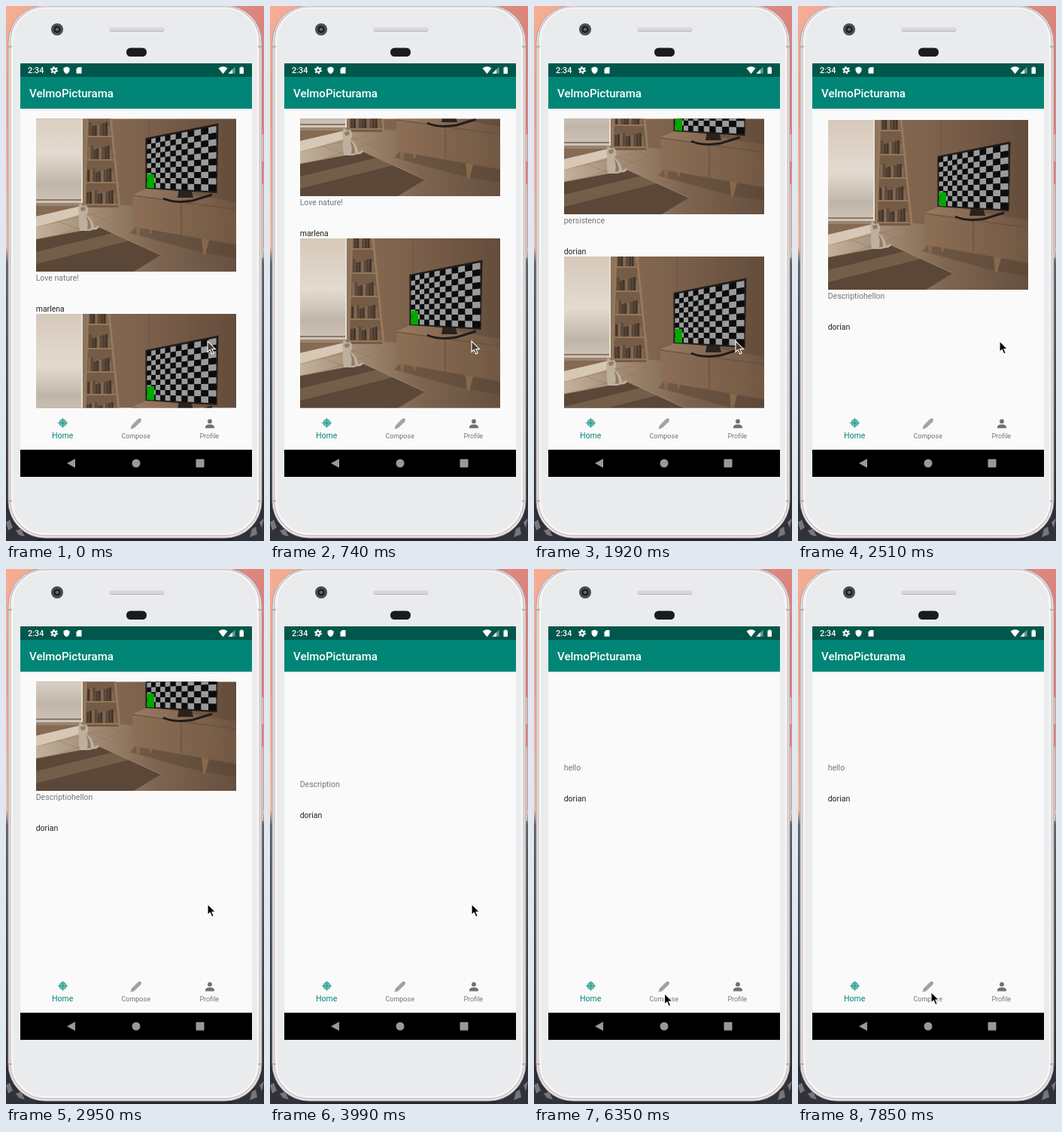
An HTML page that plays this animation: 343x709 px, repeating every 8000 ms.

```html
<!DOCTYPE html>
<html lang="en">
<head>
<meta charset="utf-8">
<title>Photo feed</title>
<style>
  html, body { margin: 0; width: 100%; height: 100%; overflow: hidden; }
  svg { display: block; width: 343px; height: 709px; }
  text { font-family: Roboto, sans-serif; }
  .feed text { font-size: 10.5px; }
  .tab { font-size: 9px; fill: #757575; text-anchor: middle; }
  .tab.on { font-size: 10.5px; fill: #008577; }
</style>
</head>
<body>
<svg viewBox="0 0 343 709" xmlns="http://www.w3.org/2000/svg">
  <defs>
    <linearGradient id="sky" x2="0" y2="1">
      <stop offset="0" stop-color="#f6ad92"/>
      <stop offset=".2" stop-color="#f0a48f"/>
      <stop offset=".45" stop-color="#f3bfa4"/>
      <stop offset=".48" stop-color="#58606c"/>
      <stop offset="1" stop-color="#25272e"/>
    </linearGradient>
    <linearGradient id="dusk">
      <stop offset="0" stop-color="#d97f86" stop-opacity="0"/>
      <stop offset="1" stop-color="#c9686c" stop-opacity=".6"/>
    </linearGradient>
    <linearGradient id="wall">
      <stop offset=".3" stop-color="#866a52"/>
      <stop offset=".65" stop-color="#775c48"/>
      <stop offset="1" stop-color="#644d3c"/>
    </linearGradient>
    <linearGradient id="floor">
      <stop offset="0" stop-color="#c3b19b"/>
      <stop offset=".4" stop-color="#957c65"/>
      <stop offset=".6" stop-color="#7c6450"/>
      <stop offset="1" stop-color="#665040"/>
    </linearGradient>
    <linearGradient id="glass" x2="0" y2="1">
      <stop offset="0" stop-color="#d6c9ba"/>
      <stop offset=".5" stop-color="#e3dad0"/>
      <stop offset=".68" stop-color="#cfc5ba"/>
      <stop offset=".8" stop-color="#c0b5a9"/>
      <stop offset="1" stop-color="#d0c5b8"/>
    </linearGradient>
    <linearGradient id="front">
      <stop offset="0" stop-color="#8d6f56"/>
      <stop offset="1" stop-color="#725843"/>
    </linearGradient>
    <linearGradient id="slab">
      <stop offset="0" stop-color="#987b61"/>
      <stop offset="1" stop-color="#6f5542"/>
    </linearGradient>
    <clipPath id="listClip"><rect x="39" y="149.5" width="268" height="383"/></clipPath>

    <symbol id="room" width="266" height="225" viewBox="0 0 266 225">
      <rect width="266" height="225" fill="url(#wall)"/>
      <path d="M150 0V112M205 0V36M250 0V130" stroke="#584333" stroke-width=".6" opacity=".5"/>
      <path d="M0 152L78 134L128 138L266 178V225H0Z" fill="url(#floor)"/>
      <path d="M0 166L90 145M30 176L115 148M20 155L60 170M60 144L110 164M100 140L165 190" stroke="#87705b" stroke-width=".7" opacity=".6"/>
      <path d="M0 152L64 137V148L0 166Z" fill="#d6c8b5"/>
      <rect width="64" height="136" fill="url(#glass)"/>
      <rect y="129" width="64" height="2" fill="#8b7865"/>
      <rect y="134" width="66" height="4" fill="#988471"/>
      <path d="M62 0H68L66 140H62Z" fill="#8c745e"/>
      <rect x="60" width="2" height="134" fill="#e6ddd2"/>
      <g id="shelf">
        <path d="M69 0H98L110 140H63Z" fill="#755c47"/>
      </g>
      <path d="M69 0L64 149" stroke="#98795d" stroke-width="2.500"/>
      <path d="M97 0L112 149" stroke="#98795d" stroke-width="3"/>
      <path d="M0 182L84 166L166 203L130 225H0Z" fill="#5b4737"/>
      <path d="M0 199L102 174L124 184L0 215Z" fill="#806a55" opacity=".65"/>
      <path d="M0 182L84 166L166 203" fill="none" stroke="#a38b72" stroke-width=".8"/>
      <path d="M125 174L222 200L266 207V190L132 166Z" fill="#54402f" opacity=".45"/>
      <path d="M132 164L134 177H137L139 166ZM220 181L222 202H225L230 183ZM150 168L151 175H153L154 169Z" fill="#86684d"/>
      <path d="M128 123L152 113L266 133V142Z" fill="url(#slab)"/>
      <path d="M128 123L266 142V189L130 165Z" fill="url(#front)"/>
      <path d="M193 133V176M128 124L266 143" fill="none" stroke="#604938" stroke-width=".8"/>
      <path d="M169 128Q184 135 208 131L234 123" fill="none" stroke="#201c1a" stroke-width="3"/>
      <path d="M190 116H206L209 127H188Z" fill="#2a221d"/>
      <path d="M145.500 48L242.500 28.500L240.500 121L145.500 115Z" fill="#211c19"/>
      <g id="screen"></g>
      <path d="M147.500 96H157V114.500L147.500 114Z" fill="#00a800"/>
      <g fill="#bfb09d">
        <path d="M56 142L58 134L62 138L67 137L69 141Q70 147 67 150Q76 156 77 166Q76 171 69 171H58Q56 160 57 150Z"/>
        <path d="M72 169Q82 171 84 165L82 164Q79 168 74 166Z"/>
      </g>
      <path d="M59 140L66 139L65 144L60 145ZM66 151Q73 157 73 168L68 169Q70 159 66 151Z" fill="#907b67"/>
    </symbol>
  </defs>

  <!-- desktop -->
  <rect width="343" height="709" fill="url(#sky)"/>
  <rect width="343" height="320" fill="url(#dusk)"/>
  <path d="M0 668L6 676L11 672L20 688L29 690L42 709H0ZM343 662L337 676L330 680L322 692L310 697L300 709H343Z" fill="#30323a"/>
  <path d="M0 684L5 681L9 691L3 695ZM13 695L20 693L25 703L17 701ZM343 679L337 684L340 692ZM327 693L332 690L334 700L324 704Z" fill="#77757a"/>

  <!-- phone -->
  <rect x="339" y="170" width="3" height="36" rx="1" fill="#d8d2d4"/>
  <rect x="339" y="236" width="3" height="98" rx="1" fill="#d8d2d4"/>
  <rect x="3" y="-1" width="337" height="706" rx="49" fill="#f1eced" stroke="#a4989b"/>
  <rect x="5.500" y="1" width="332" height="701" rx="47" fill="none" stroke="#cabfc2" stroke-width="1.500"/>
  <rect x="8.500" y="2.500" width="326" height="697" rx="44" fill="#eaebed" stroke="#f8f7f8" stroke-width="1.500"/>
  <path d="M3 54H8M335 54H340M3 656H8M335 656H340" stroke="#aaa3a6" stroke-width="1.500"/>
  <circle cx="68" cy="31" r="8" fill="#46494e"/>
  <circle cx="68" cy="31" r="5.500" fill="#222429" stroke="#6b6e74" stroke-width=".8"/>
  <circle cx="68" cy="31" r="2" fill="#6a6e77"/>
  <rect x="137" y="28.500" width="74" height="5.500" rx="2.700" fill="#d8d8da"/>
  <path d="M139 33.500H209" stroke="#b4b4b7"/>
  <rect x="160" y="55.500" width="27" height="11.500" rx="5.500" fill="#191a22"/>

  <!-- app bars -->
  <rect x="19" y="76" width="308" height="548" fill="#fafafa"/>
  <rect x="19" y="136" width="308" height="1" fill="#dfe4e3"/>
  <rect x="19" y="137" width="308" height="1.500" fill="#f1f3f3"/>
  <rect x="19" y="94" width="308" height="42" fill="#008577"/>
  <rect x="19" y="76" width="308" height="18" fill="#00574b"/>
  <g fill="#fff">
    <text x="29" y="89" font-size="10.800" font-weight="500">2:34</text>
    <text x="31" y="121" font-size="15" font-weight="500">VelmoPicturama</text>
    <circle cx="64" cy="85" r="4.200" fill="none" stroke="#fff" stroke-width="1.700" stroke-dasharray="2.200"/>
    <circle cx="64" cy="85" r="2.600" fill="none" stroke="#fff" stroke-width="2"/>
    <path d="M80.500 80.500L84.500 82V85Q84 88.500 80.500 90Q77 88.500 76.500 85V82Z"/>
    <path d="M96 81H100.500V89.500H93.500V83.500Z"/>
    <path d="M282.500 82.500Q288.500 78 294.500 82.500L288.500 90Z"/>
    <path d="M304.500 80.500V89.500H295.500Z" opacity=".4"/>
    <path d="M301 84V89.500H295.500Z"/>
    <path d="M310.500 81.500H312V80.500H314.500V81.500H316V89.700H310.500Z"/>
  </g>

  <g class="feed" clip-path="url(#listClip)"><g id="list"></g></g>

  <!-- tabs -->
  <g fill="none" stroke="#35a598">
    <circle cx="75.500" cy="552.500" r="4.300" stroke-width="1.600" fill="#8fcbc4"/>
    <path d="M75.500 546V559M69 552.500H82" stroke-width="1.200"/>
    <circle cx="75.500" cy="552.500" r="1.800" fill="#35a598"/>
  </g>
  <path d="M165.500 560.500L166.800 556L175 547.800Q176.500 546 178.500 546.500L180 548Q180.500 550 178.700 551.400L170.200 559.500Z" fill="#a3a3a3"/>
  <g fill="#707070">
    <circle cx="271" cy="550.400" r="2.900"/>
    <path d="M265 559.500V557.500Q266 554.500 271 554.500T277 557.500V559.500Z"/>
  </g>
  <text class="tab on" x="75.200" y="573">Home</text>
  <text class="tab" x="172.700" y="573">Compose</text>
  <text class="tab" x="270.300" y="573">Profile</text>

  <rect x="19" y="588" width="308" height="36" fill="#000"/>
  <g fill="#999">
    <path d="M92 600V612L81 606Z"/>
    <circle cx="173" cy="606" r="5.500"/>
    <rect x="252.500" y="600.500" width="11" height="11" rx="1"/>
  </g>

  <path id="cursor" d="M0 0V14.500L3.300 11.500L5.700 17L8.200 16L5.900 10.600H10.500Z" stroke="#fff" stroke-width="1.100"/>
</svg>

<script>
const LOOP = 8000, TOP = 127, PITCH = 281, PHOTO = 225;

// [author, caption, photo loaded]
const posts = [
  ['marlena', 'Love nature!', true],
  ['marlena', 'persistence', true],
  ['dorian', 'Descriptiohellon', true],
  ['dorian', 'Description', false],
  ['dorian', 'hello', false],
  ['dorian', '', false]
];

// [time, list offset]
const scroll = [
  [0, 0], [150, 6], [440, 40], [590, 76], [740, 100], [890, 110],
  [1180, 155], [1330, 217], [1480, 284], [1630, 326], [1770, 348], [1920, 357],
  [2360, 450], [2510, 538], [2660, 588], [2800, 612], [2950, 620],
  [3250, 720], [3400, 818], [3550, 872], [3700, 900], [3840, 913], [3990, 918],
  [4290, 1029], [4440, 1108], [4580, 1156], [4730, 1186], [4880, 1204],
  [5030, 1213], [5170, 1218], [5320, 1220], [5470, 1221]
];

// [time, x, y]
const pointer = [
  [0, 268, 444], [5470, 267, 454], [5620, 261, 493], [5760, 246, 545],
  [5910, 220, 580], [6060, 194, 582], [6200, 178, 570], [6350, 173.5, 562.5],
  [7850, 177, 560.5]
];

const byId = id => document.getElementById(id);

function add(parent, tag, attrs, text) {
  const node = document.createElementNS('http://www.w3.org/2000/svg', tag);
  for (const key in attrs) node.setAttribute(key, attrs[key]);
  if (text) node.textContent = text;
  parent.append(node);
  return node;
}

// Checkerboard in perspective: the right edge is nearer.
function buildScreen() {
  const cols = 12, rows = 10, group = byId('screen');
  const point = (c, r) => {
    const s = c / cols, u = s / (s + (1 - s) * 1.4), v = r / rows;
    const top = 50 - 18 * u, bottom = 113.5 + 5 * u;
    return `${147.5 + 92 * u} ${top + (bottom - top) * v}`;
  };
  for (let c = 0; c < cols; c++) for (let r = 0; r < rows; r++) {
    const corners = [point(c, r), point(c + 1, r), point(c + 1, r + 1), point(c, r + 1)];
    add(group, 'path', { d: `M${corners.join('L')}Z`, fill: (c + r) % 2 ? '#999a9b' : '#0c0c0d' });
  }
}

function buildShelf() {
  const group = byId('shelf'), tones = ['#4d3c2f', '#5c4838', '#806a55', '#44352a'];
  [13, 45, 76, 106, 135].forEach((y, row) => {
    const left = 69 - y * 0.035, right = 97 + y * 0.09;
    for (let i = 0; left + 4 + i * 3.6 < right - 4; i++) {
      const tall = 13 + (i * 7 + row * 5) % 6;
      add(group, 'rect', { x: left + 3 + i * 3.6, y: y - tall, width: 3, height: tall, fill: tones[(i * 3 + row) % 4] });
    }
    add(group, 'rect', { x: left, y, width: right - left, height: 2, fill: '#957759' });
  });
}

function buildList() {
  const list = byId('list');
  posts.forEach(([author, caption, loaded], i) => {
    const y = TOP + PITCH * i;
    add(list, 'text', { x: 39.7, y: y - 3.3, fill: '#222' }, author);
    if (loaded) add(list, 'use', { href: '#room', x: 40, y, width: 266, height: PHOTO });
    add(list, 'text', { x: 39.7, y: y + PHOTO + 11.7, fill: '#757575' }, caption);
  });
}

const at = (table, t) => table.findLast(step => step[0] <= t);

function draw(t) {
  const offset = at(scroll, t)[1];
  const [, x, y] = at(pointer, t);
  byId('list').setAttribute('transform', `translate(0 ${-offset})`);
  const overPhoto = posts.some(([, , loaded], i) => {
    const depth = y + 8 - (TOP + PITCH * i - offset);
    return loaded && depth > 0 && depth < PHOTO;
  });
  const cursor = byId('cursor');
  cursor.setAttribute('transform', `translate(${x} ${y})`);
  cursor.setAttribute('fill', overPhoto ? '#4a392c' : '#000');
}

buildScreen();
buildShelf();
buildList();

const start = performance.now();
function tick() {
  draw((performance.now() - start) % LOOP);
  requestAnimationFrame(tick);
}
draw(0);
requestAnimationFrame(tick);
</script>
</body>
</html>
```
